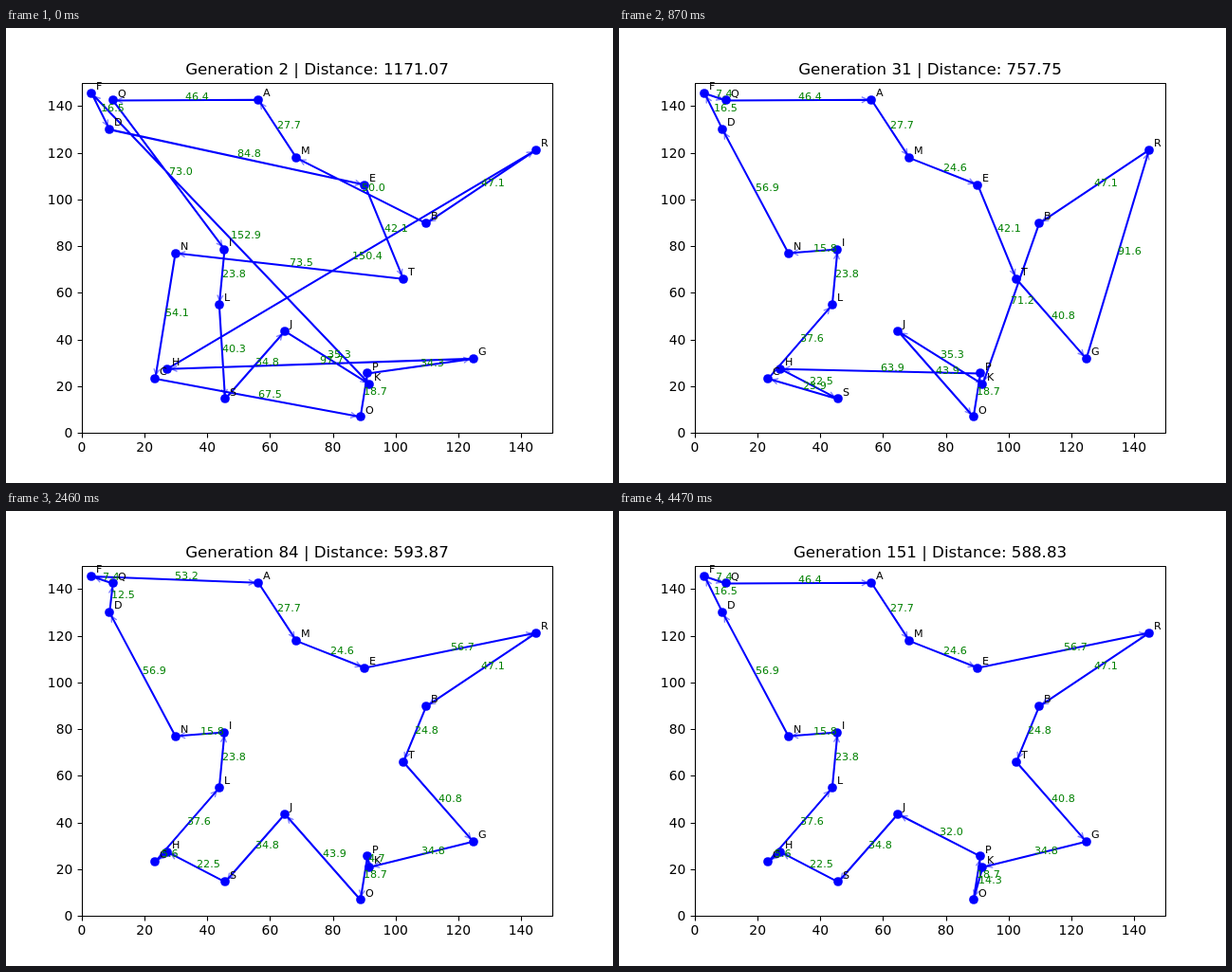
Animation, 640 px wide and 480 px high, one loop 4.5 s. Source, as an HTML page with a canvas:

```html
<!DOCTYPE html>
<html lang="en">
<head>
<meta charset="utf-8">
<title>Route search</title>
<style>
  html, body { margin: 0; width: 100%; height: 100%; overflow: hidden; background: #fff; }
  canvas { display: block; }
</style>
</head>
<body>
<canvas id="plot" width="640" height="480"></canvas>
<script>
const ctx = document.getElementById('plot').getContext('2d');
const PT = 100 / 72;            // one point in pixels
const STEP = 30, LOOP = 4500;   // ms
const BLUE = '#00f';

const cities = {
  A: [56.3, 142.65],  B: [109.79, 89.7],  C: [23.4, 23.25],   D: [8.83, 129.9],
  E: [90.22, 106.2],  F: [3.13, 145.38],  G: [124.82, 31.8],  H: [27.23, 27.4],
  I: [45.5, 78.59],   J: [64.74, 43.6],   K: [91.78, 20.85],  L: [43.8, 54.81],
  M: [68.43, 117.72], N: [29.82, 76.98],  O: [88.84, 6.87],   P: [91.06, 25.48],
  Q: [9.9, 142.35],   R: [144.85, 121.2], S: [45.67, 14.51],  T: [102.5, 65.95]
};

// first generation, visiting order, total distance
const tours = [
  [2, 'FDETNCOPGHRBMAQILSJK', '1171.07'],
  [6, 'FAMTGERBLNPKOHJSCIDQ', '876.32'],
  [16, 'FQAMETGRBKJOPHSCLIND', '757.75'],
  [46, 'FQAMETGRBKJPOSHCLIND', '707.47'],
  [66, 'FQAMERBTGKJPOSHCLIND', '618.94'],
  [78, 'FAMERBTGKPOJSHCLINDQ', '593.87'],
  [88, 'FAMERBTGKOPJSHCLINDQ', '591.67'],
  [102, 'FQAMERBTGKOPJSHCLIND', '588.83']
];

const px = x => 80 + x * 496 / 150;
const py = y => 427.2 - y * 369.6 / 150;
const at = name => [px(cities[name][0]), py(cities[name][1])];

function text(str, x, y, size, color = '#000', align = 'left') {
  ctx.font = `${size * PT}px "DejaVu Sans", sans-serif`;
  ctx.fillStyle = color;
  ctx.textAlign = align;
  ctx.fillText(str, x, Math.round(y));
}

function drawAxes() {
  ctx.strokeStyle = '#000';
  ctx.lineWidth = 0.8 * PT;
  ctx.strokeRect(80.5, 58.5, 496, 369);
  ctx.beginPath();
  for (let v = 0; v <= 140; v += 20) {
    const x = Math.round(px(v)) + 0.5, y = Math.round(py(v)) + 0.5;
    ctx.moveTo(x, 427.5);
    ctx.lineTo(x, 432.4);
    ctx.moveTo(80.5, y);
    ctx.lineTo(75.6, y);
    text(v, px(v), 447, 10, '#000', 'center');
    text(v, 70.3, py(v) + 5.1, 10, '#000', 'right');
  }
  ctx.stroke();
}

function drawRoute(order) {
  ctx.strokeStyle = BLUE;
  ctx.lineWidth = 1.5 * PT;
  ctx.lineJoin = 'round';
  ctx.beginPath();
  for (const name of order) ctx.lineTo(...at(name));
  ctx.closePath();
  ctx.stroke();

  ctx.fillStyle = BLUE;
  for (const name of order) {
    const [x, y] = at(name);
    ctx.beginPath();
    ctx.arc(Math.round(x), Math.round(y), 3.5 * PT, 0, 2 * Math.PI);
    ctx.fill();
  }
}

function drawHead([x1, y1], [x2, y2]) {
  ctx.save();
  ctx.translate(x2, y2);
  ctx.rotate(Math.atan2(y2 - y1, x2 - x1));
  ctx.globalAlpha = 0.5;
  ctx.strokeStyle = BLUE;
  ctx.lineWidth = PT;
  ctx.lineCap = 'round';
  ctx.beginPath();
  ctx.moveTo(-9.9, -2 * PT);
  ctx.lineTo(-4.3, 0);
  ctx.lineTo(-9.9, 2 * PT);
  ctx.stroke();
  ctx.restore();
}

function drawLabels(order) {
  for (const name in cities) {
    const [x, y] = cities[name];
    text(name, Math.round(px(x + 1.5)), py(y + 1.5), 8);
  }
  [...order].forEach((from, i) => {
    const to = order[(i + 1) % order.length];
    const a = at(from), b = at(to);
    const [p, q] = [cities[from], cities[to]];
    const dist = Math.hypot(p[0] - q[0], p[1] - q[1]);
    drawHead(a, b);
    text(dist.toFixed(1), Math.round((a[0] + b[0]) / 2), (a[1] + b[1]) / 2, 8, '#008000');
  });
}

function draw(gen) {
  const [, order, total] = tours.findLast(tour => tour[0] <= gen);
  ctx.fillStyle = '#fff';
  ctx.fillRect(0, 0, 640, 480);
  drawRoute(order);
  drawAxes();
  drawLabels(order);
  text(`Generation ${gen} | Distance: ${total}`, 328, 49, 12, '#000', 'center');
}

let shown = 0;
function tick() {
  const gen = 2 + Math.floor(performance.now() % LOOP / STEP);
  if (gen !== shown) draw(shown = gen);
  requestAnimationFrame(tick);
}
tick();
</script>
</body>
</html>
```
